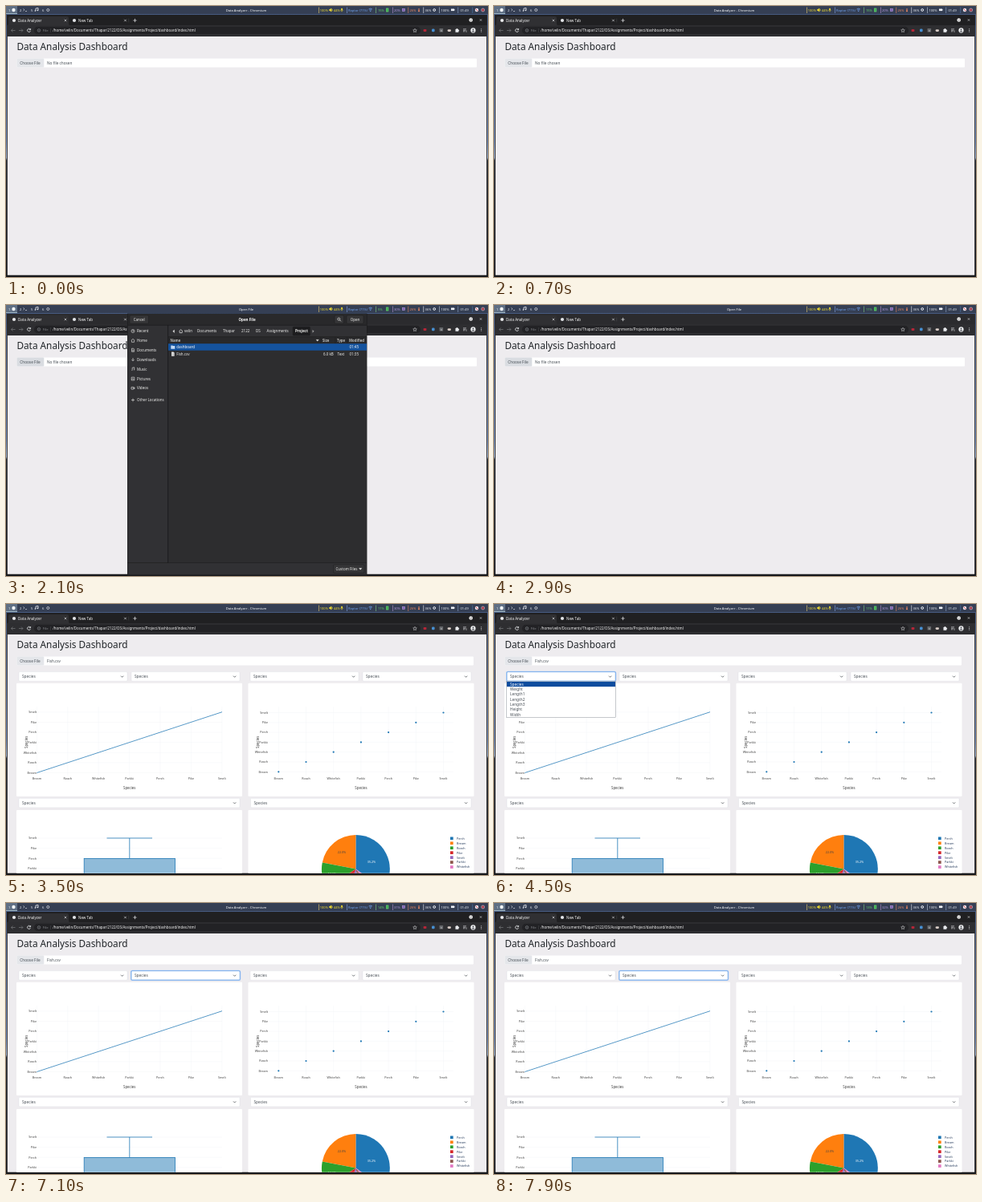
Animation of 600 by 338 pixels, one loop 8000 ms. Source, as an HTML page:

```html
<!DOCTYPE html>
<html lang="en">
<head>
<meta charset="utf-8">
<title>Data Analyzer</title>
<style>
html, body { margin: 0; width: 100%; height: 100%; overflow: hidden; background: #111; }
svg { display: block; width: 100vw; height: 100vh; }
text { font-family: "Noto Sans", "Open Sans", sans-serif; white-space: pre; }
</style>
</head>
<body>
<svg id="stage" viewBox="0 0 600 338" preserveAspectRatio="none">
  <defs>
    <linearGradient id="wall" x2="0" y2="1">
      <stop offset="0" stop-color="#44577c"/><stop offset=".5" stop-color="#6f8dc0"/>
      <stop offset=".56" stop-color="#a0b5d2"/><stop offset=".57" stop-color="#2a3039"/><stop offset="1" stop-color="#17191e"/>
    </linearGradient>
    <clipPath id="page"><path d="M1.8 38H598.2V335.7H1.8Z"/></clipPath>
  </defs>
</svg>
<script>
const svg = document.getElementById('stage');
const LOOP = 8000;
const BLUE = '#1f77b4', INK = '#2a3f5f', DARK = '#212529', GRAY = '#495057';
const SPECIES = ['Bream', 'Roach', 'Whitefish', 'Parkki', 'Perch', 'Pike', 'Smelt'];
const FIELDS = ['Species', 'Weight', 'Length1', 'Length2', 'Length3', 'Height', 'Width'];
const timed = [];
let layer = svg;

function add(tag, attrs, str) {
  const el = document.createElementNS('http://www.w3.org/2000/svg', tag);
  for (const k in attrs) el.setAttribute(k, attrs[k]);
  if (str !== undefined) el.textContent = str;
  return layer.appendChild(el);
}
const rect = (x, y, w, h, fill, more) => add('rect', { x, y, width: w, height: h, fill, ...more });
const dot = (cx, cy, r, fill, more) => add('circle', { cx, cy, r, fill, ...more });
const path = (d, stroke, w = .6, more) => add('path', { d, stroke, 'stroke-width': w, fill: 'none', ...more });
const text = (x, y, str, size, fill, more) => add('text', { x, y, 'font-size': size, fill, ...more }, str);
const MID = { 'text-anchor': 'middle' }, END = { 'text-anchor': 'end' };

// Draws into a group that is visible only within the given spans of time.
function during(spans, draw, attrs = {}) {
  const outer = layer, g = add('g', attrs);
  timed.push({ g, spans });
  layer = g;
  draw();
  layer = outer;
}

function topBar() {
  rect(0, 0, 600, 338, 'url(#wall)');
  rect(0, 0, 600, 10, '#353f54');
  rect(0, 0, 14, 10, '#5f6f84');
  rect(0, 9.2, 14, .8, '#a9c3cf');
  const c = '#eceff4';
  text(3, 6.6, '1', 4.2, c);
  dot(9.5, 5, 2.2, '#f2f5f8');
  text(17, 6.6, '2', 4.2, c);
  path('M21.5 3.5l1.5 1.3-1.5 1.3M24 6.5h2', c, .6);
  text(31, 6.6, '5', 4.2, c);
  path('M37 6V3l3-.6v3', c, .8);
  dot(36.4, 6, .8, c); dot(39.4, 5.4, .8, c);
  text(45, 6.6, '6', 4.2, c);
  dot(52.3, 5, 1.5, 'none', { stroke: c, 'stroke-width': .7 });

  const bars = [[389, '#ebcb6b'], [424, '#81a1e1'], [460, '#7ec87e'], [481, '#b48ecf'], [500.5, '#e0815f'], [519.5, '#e5e9f0'], [539, '#b9c7d8'], [562.5, '#8fa8c8'], [580.5, '#4d78a8']];
  bars.forEach(([x, col]) => rect(x, 1.5, .6, 7.5, col));
  const yellow = '#f5e02f', sky = '#6fa0ea';
  text(390.8, 6.5, '100%', 4, yellow);
  path('M402.5 4.2h1l1.4-1.2v4l-1.4-1.2h-1ZM405.8 3.6q1 1.4 0 2.8', yellow, .5, { fill: yellow });
  text(408, 6.5, '44%', 4, yellow);
  rect(417.2, 2.8, 1.7, 2.7, yellow, { rx: .8 });
  path('M416.6 4.8q0 1.5 1.4 1.5t1.4-1.5M418 6.3v1', yellow, .5);
  text(426, 6.5, 'Raptor (71%)', 4, sky);
  path('M451.5 4q2.2-1.8 4.4 0M452.4 5.2q1.3-1 2.6 0', sky, .8);
  dot(453.7, 6.4, .6, sky);
  rect(473.5, 3, 2.4, 4, '#39a653', { stroke: '#65d96b', 'stroke-width': .7 });
  rect(493.5, 3.4, 2.8, 3, '#7d63b0', { stroke: '#b69ae0', 'stroke-width': .6 });
  text(502.5, 6.5, '26%', 4, '#ef8a62');
  path('M514 3v2.6', '#ef8a62', 1);
  dot(514, 6.2, 1, '#ef8a62');
  text(521.5, 6.5, '36%', 4, c);
  dot(533.2, 5, 1.4, 'none', { stroke: c, 'stroke-width': 1 });
  text(541.5, 6.5, '100%', 4, c);
  rect(554, 3.5, 4, 2.6, c); rect(558, 4.2, .6, 1.2, c);
  text(565.5, 6.5, '01:49', 4, c);
  dot(586, 5, 2.2, '#e9e9ee');
  path('M584.6 3.6l2.8 2.8', '#d34450', 1);
  dot(593.7, 5, 2, '#a83a4a', { stroke: '#d9dfe8', 'stroke-width': .5 });

  during([[0, 900], [3000, LOOP]], () => text(299, 6.5, 'Data Analyzer - Chromium', 4.1, '#ffffff', MID));
  during([[900, 3000]], () => text(299, 6.5, 'Open File', 4.1, '#ffffff', MID));
  const loads = [[0, 15, 20], [900, 5, 30], [2800, 11, 30], [3700, 11, 30], [5500, 14, 31], [7300, 13, 32]];
  loads.forEach(([from, cpu, mem], i) => {
    const to = i + 1 < loads.length ? loads[i + 1][0] : LOOP;
    during([[from, to]], () => {
      text(463, 6.5, cpu + '%', 4, '#65d96b');
      text(483, 6.5, mem + '%', 4, '#b69ae0');
    });
  });
}

function browser() {
  const c = '#e8eaed', dim = '#77797c';
  rect(1, 11, 598, 326, '#151516');
  rect(1, 11, 598, 13.5, '#202022');
  // The title strip turns lighter while the window is not focused.
  during([[900, 3000]], () => rect(1, 11, 598, 13.5, '#2b2b2e'));
  add('path', { d: 'M1 24.2q2 0 2-2V15q0-2 2-2H76q2 0 2 2v7.2q0 2 2 2Z', fill: '#303033' });
  dot(10, 18, 2.1, '#e9eaec');
  text(15, 19.9, 'Data Analyzer', 4.5, '#f4f4f4');
  dot(85, 18, 2.1, '#e2e4e7');
  text(90, 19.9, 'New Tab', 4.5, '#f4f4f4');
  const cross = (x, y, r = 1.3) => path(`M${x - r} ${y - r}l${2 * r} ${2 * r}m0-${2 * r}l-${2 * r} ${2 * r}`, c, .6);
  cross(74, 18); cross(148.5, 18); cross(591, 17.5, 1.1);
  rect(152.7, 15.5, .4, 5, '#55575a');
  path('M158.3 18h4.4M160.5 15.8v4.4', c, .7);
  dot(578.7, 17.5, 2.3, '#f2f2f2');
  path('M577.7 17.1l1 .9 1-.9', '#222', .6);
  rect(1, 24, 598, 14, '#2e2e31');
  path('M11.5 30.5H6.5m2-2l-2 2 2 2', dim, .7);
  path('M16 30.5h5m-2-2l2 2-2 2', dim, .7);
  path('M30.2 29.2a2 2 0 1 0 .3 1.8M30.6 28v1.7h-1.8', c, .8);
  rect(35, 25.8, 481, 9.3, '#222225', { rx: 4.6 });
  dot(41, 30.4, 1.8, 'none', { stroke: '#9aa0a6', 'stroke-width': .5 });
  path('M41 30v1.4M41 29.2v.4', '#9aa0a6', .5);
  text(45.7, 32, 'File', 4.3, '#85888c');
  rect(55, 28, .4, 5, '#55575a');
  text(58.2, 32, '/home/velin/Documents/Thapar/2122/DS/Assignments/Project/dashboard/index.html', 4.42, '#f4f4f4');
  add('path', { d: 'M509 28.2l.7 1.5 1.6.2-1.2 1.1.3 1.6-1.4-.8-1.4.8.3-1.6-1.2-1.1 1.6-.2Z', fill: 'none', stroke: c, 'stroke-width': .5 });
  rect(519.6, 28.9, 3.8, 3.2, '#b32638', { rx: .8 });
  rect(530, 28.4, 3.6, 3.8, '#4790d3', { rx: 1.3 });
  rect(539.5, 28, 4.6, 4.6, '#65676b', { rx: .5 });
  text(541.8, 31.7, 'x', 3.4, c, MID);
  rect(549.6, 29.3, 4.4, 2.6, '#d8ccc6', { rx: 1.3 });
  path('M559.7 29h3.4v3.6h-3.4Z', c, .4, { fill: c });
  dot(561.4, 28.7, .8, c); dot(563.4, 30.8, .8, c);
  path('M569 28.8h4M569 30.3h3M569 31.8h2', c, .6);
  path('M573 30v2.5l-1-1', c, .5);
  dot(581.5, 30.4, 3.1, '#f0f1f3');
  dot(581.5, 29.5, 1, '#45484e');
  path('M579.8 32.2q1.7-2 3.4 0Z', '#45484e', .4, { fill: '#45484e' });
  for (const y of [28.7, 30.4, 32.1]) dot(591.7, y, .5, c);
  rect(1.8, 38, 596.4, 297.7, '#eeecef');
  text(13.4, 54.5, 'Data Analysis Dashboard', 11.8, DARK);
}

function fileInput(right, name, button) {
  rect(13.5, 65.5, right - 13.5, 11, '#ffffff', { rx: 1 });
  rect(13.5, 65.5, 33.8, 11, button, { rx: 1 });
  text(17.2, 72.8, 'Choose File', 4.75, GRAY);
  text(51, 72.8, name, 4.72, GRAY);
}

function select(x, y, w) {
  rect(x, y, w, 11.6, '#ffffff', { rx: 1.2, stroke: '#ced4da', 'stroke-width': .3 });
  text(x + 4, y + 7.6, 'Species', 4.75, GRAY);
  path(`M${x + w - 8} ${y + 5.1}l1.6 1.6 1.6-1.6`, '#343a40', .7);
}

function focusRing(x) {
  rect(x - .4, 84.3, 136, 12.1, 'none', { rx: 1.5, stroke: '#9fc3f3', 'stroke-width': 1.2 });
  rect(x, 84.7, 135.2, 11.3, 'none', { rx: 1.2, stroke: '#5e9ce6', 'stroke-width': .5 });
}

function axes(x0, dx, y0, dy, left, right, labelX, titleX) {
  SPECIES.forEach((name, i) => {
    const x = x0 + dx * i, y = y0 - dy * i;
    path(`M${x} 128V214M${left} ${y}H${right}`, '#eef0f3', .35);
    text(x, 218.6, name, 3.7, '#444', MID);
    text(labelX, y + 1.3, name, 3.7, '#444', END);
  });
  text((left + right) / 2, 230.6, 'Species', 4.4, '#444', MID);
  text(0, 0, 'Species', 4.4, '#444', { ...MID, transform: `translate(${titleX} 172.3) rotate(-90)` });
}

function pie(cx, cy, r) {
  const parts = [['Perch', 35.2, BLUE], ['Bream', 22, '#ff7f0e'], ['Roach', 12.6, '#2ca02c'], ['Pike', 10.7, '#d62728'], ['Smelt', 8.8, '#9467bd'], ['Parkki', 6.9, '#8c564b'], ['Whitefish', 3.8, '#e377c2']];
  let turn = .352;
  const at = f => `${cx + r * Math.sin(f * 2 * Math.PI)} ${cy - r * Math.cos(f * 2 * Math.PI)}`;
  parts.forEach(([name, pct, fill], i) => {
    const next = turn - pct / 100;
    add('path', { d: `M${cx} ${cy}L${at(turn)}A${r} ${r} 0 0 0 ${at(next)}Z`, fill });
    turn = next;
    const y = 292.4 + 5.95 * i;
    rect(553, y - 1.9, 3.7, 3.7, fill);
    text(561, y + 1.3, name, 3.7, INK);
  });
  text(455, 322.9, '35.2%', 3.7, '#fff', MID);
  text(418, 311.4, '22.0%', 3.7, '#444', MID);
  text(406, 338, '12.6%', 3.7, '#fff', MID);
}

function charts() {
  const card = (x, y, h) => rect(x, y, 281, h, '#ffffff', { rx: 1 });
  card(13, 98.7, 141.3); card(301.5, 98.7, 141.3);
  card(13, 257, 79); card(301.5, 257, 79);
  for (const x of [16, 156, 304, 444]) select(x, 84.6, 135);
  select(16, 242.3, 275); select(304.5, 242.3, 274.5);

  axes(38.4, 38.4, 210.5, 12.6, 38.4, 269, 38, 27);
  path('M38.4 210.5L269 134.7', BLUE, .75);

  axes(339.3, 34.2, 209.3, 12.3, 327, 557, 326, 314.5);
  SPECIES.forEach((_, i) => dot(339.3 + 34.2 * i, 209.3 - 12.3 * i, 1.1, BLUE));

  SPECIES.slice(3).reverse().forEach((name, i) => {
    const y = 292 + 12.6 * i;
    path(`M38.4 ${y}H269`, '#eef0f3', .35);
    text(38, y + 1.3, name, 3.7, '#444', END);
  });
  rect(97.2, 317.5, 113.2, 30, '#8fbbd9', { stroke: BLUE, 'stroke-width': .8 });
  path('M153.8 317.5V292M125.5 292H182', BLUE, .8);
  pie(435.4, 330.4, 42.4);
}

function options() {
  rect(15.6, 96.5, 135.8, 45, '#ffffff', { stroke: '#8c929a', 'stroke-width': .5 });
  rect(16, 96.9, 135, 6.2, '#0e4c9e');
  FIELDS.forEach((f, i) => text(20, 101.8 + 6.32 * i, f, 4.75, i ? GRAY : '#ffffff'));
}

const ICONS = {
  Recent: 'M-2 0a2 2 0 1 0 4 0a2 2 0 1 0-4 0M0-1.2V0H1',
  Home: 'M-2.2 0L0-2 2.2 0M-1.5 0V2H1.5V0',
  Documents: 'M-1.5-2H.7L1.6-1V2H-1.5ZM-.7 0H.8M-.7 1H.8',
  Downloads: 'M0-2V1.6M-1.6 0L0 1.7 1.6 0',
  Music: 'M-.8 1.4V-1.8L1.7-2.2V1M-1.5 1.5h.7M1 1h.7',
  Pictures: 'M-1.8-1.9H1.8V1.9H-1.8ZM-1.5 1.2L-.3-.3 1.5 1.2',
  Videos: 'M-2-1.3H.8V1.3H-2ZM.8 0L2-1V1Z',
  'Other Locations': 'M-2 0H2M0-2V2'
};

function dialog() {
  const c = '#eeeeec', edge = { rx: 1.3, stroke: '#1b1b1b', 'stroke-width': .4 };
  const button = (x, w, label) => {
    rect(x, 13, w, 10.2, '#353537', edge);
    text(x + w / 2, 19.8, label, 4.5, c, MID);
  };
  rect(151, 10.6, 298.4, 326.8, '#171718');
  rect(151.5, 11, 297.4, 14, '#29292b');
  button(154, 23.5, 'Cancel'); button(424, 21, 'Open'); button(409, 11.5, '');
  dot(414.3, 17.6, 1.5, 'none', { stroke: c, 'stroke-width': .7 });
  path('M415.4 18.7l1.6 1.6', c, .8);
  text(300, 19.8, 'Open File', 4.5, '#ffffff', { ...MID, 'font-weight': 700 });
  rect(151.5, 25.3, 50, 296.3, '#313134');
  rect(202, 25.3, 247, 14.4, '#313134');
  rect(202, 39.8, 247, 282, '#2d2d2f');
  rect(202, 39.8, 247, 8.4, '#29292b');
  path('M201.7 25V321.7M151 321.7H449M151 25.1H449M202 39.8H449', '#1b1b1c', .4);

  [32.5, 44.3, 56.2, 68, 80, 92, 103.7, 118.5].forEach((y, i) => {
    const name = Object.keys(ICONS)[i];
    path(ICONS[name], c, .6, { transform: `translate(158 ${y})` });
    text(163, y + 1.7, name, 4.5, c);
  });

  rect(357, 27.2, 21.5, 10.8, '#1d1d1f', edge);
  path('M209.5 31l-1.8 1.8 1.8 1.8Z', c, .3, { fill: c });
  path(ICONS.Home, c, .7, { transform: 'translate(217.7 32.7)' });
  const crumbs = [[222, 'velin'], [238, 'Documents'], [270, 'Thapar'], [293, '2122'], [311, 'DS'], [324.5, 'Assignments'], [360, 'Project']];
  crumbs.forEach(([x, s]) => text(x, 34.4, s, 4.5, c, s === 'Project' ? { 'font-weight': 600 } : {}));
  path('M381.7 31.2l1.6 1.6-1.6 1.6Z', '#a5a5a5', .3, { fill: '#a5a5a5' });

  [[204.5, 'Name'], [394, 'Size'], [412, 'Type'], [427, 'Modified']].forEach(([x, s]) => text(x, 45.7, s, 4.3, '#bdbdbb', { 'font-weight': 600 }));
  path('M386 43.2h3.4l-1.7 2Z', c, .2, { fill: c });
  path('M391.7 40v8M409.8 40v8M424.7 40v8', '#1b1b1c', .4);

  during([[900, 2600]], () => rect(202, 48.2, 247, 8.5, '#15539e'));
  during([[2600, 2800]], () => rect(202, 56.7, 247, 8.5, '#15539e'));
  add('path', { d: 'M205.3 50.4h2l.6.7h2.4v3.6h-5Z', fill: '#c3daf5' });
  text(212.2, 54.1, 'dashboard', 4.5, '#ffffff');
  text(427.5, 54.1, '01:45', 4.5, '#ffffff');
  add('path', { d: 'M206 58.4h2.4l1.2 1.2v4.2H206Z', fill: '#e4e4e4' });
  path('M206.7 60.4h2M206.7 61.5h2.1M206.7 62.6h2.1', '#888', .35);
  text(212.2, 62.6, 'Fish.csv', 4.5, c);
  text(407.8, 62.6, '6.0 kB', 4.5, c, END);
  text(412.5, 62.6, 'Text', 4.5, c);
  text(427.5, 62.6, '01:35', 4.5, c);

  rect(151.5, 321.9, 297.4, 14.6, '#313134');
  rect(407.5, 323.8, 38.5, 10.5, '#353537', edge);
  text(410.5, 330.8, 'Custom Files', 4.5, c);
  path('M439.5 328.2h3.4l-1.7 2Z', c, .3, { fill: c });
}

topBar();
browser();
during([[0, 900]], () => fileInput(586, 'No file chosen', '#e4e6ea'));
during([[900, 3300]], () => fileInput(586, 'No file chosen', '#d9dce1'));
during([[3300, LOOP]], () => {
  fileInput(582, 'Fish.csv', '#e4e6ea');
  charts();
}, { 'clip-path': 'url(#page)' });
during([[4100, 7000]], () => focusRing(16));
during([[4100, 6000]], options);
during([[7000, LOOP]], () => focusRing(156));
during([[900, 2800]], dialog);

function frame(now) {
  const t = now % LOOP;
  for (const { g, spans } of timed)
    g.style.display = spans.some(([a, b]) => t >= a && t < b) ? '' : 'none';
  requestAnimationFrame(frame);
}
frame(performance.now());
</script>
</body>
</html>
```
